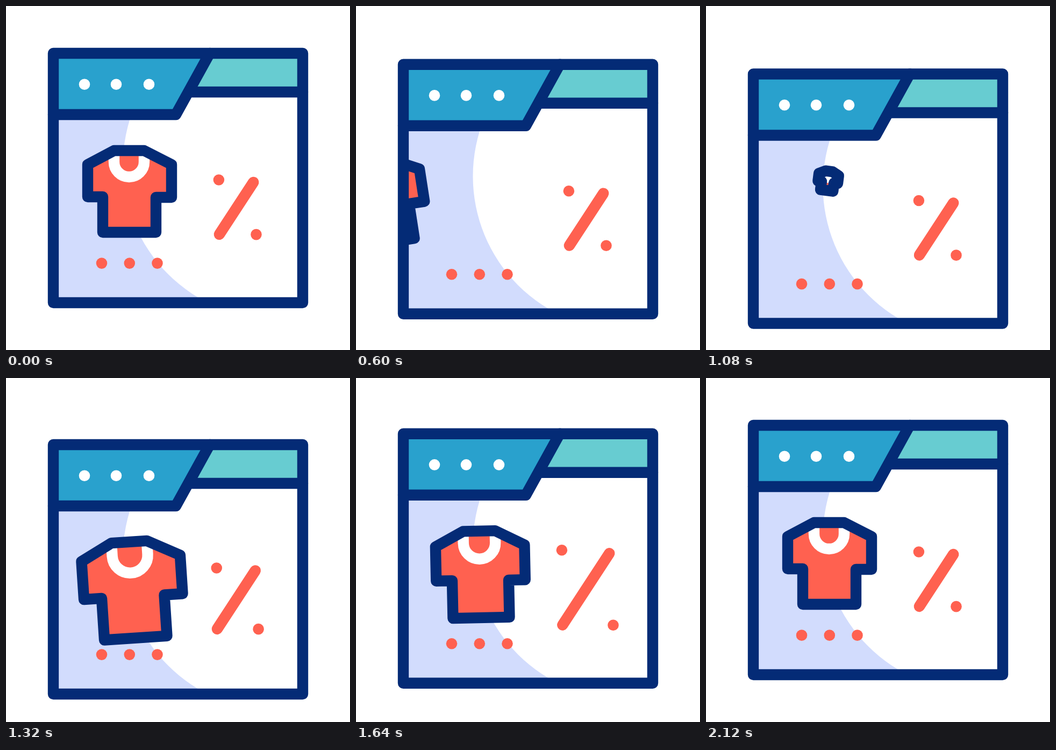
Write an HTML page with a canvas that moves like this. It is 640 px wide and 640 px high and loops after 2.28 s.

```html
<!DOCTYPE html>
<html lang="en">
<head>
<meta charset="utf-8">
<title>Shop window</title>
<style>
  html, body { margin: 0; width: 100%; height: 100%; overflow: hidden; background: #fff; }
  canvas { display: block; width: 100vmin; height: 100vmin; }
</style>
</head>
<body>
<canvas id="stage" width="640" height="640"></canvas>
<script>
const ctx = document.getElementById('stage').getContext('2d');
const LOOP = 2280, STEP = 40;
const NAVY = '#042b76', BLUE = '#29a1cd', TEAL = '#67ccd1',
      RED = '#ff6150', LILAC = '#d2dcfd', WHITE = '#fff';
const LINE = 20.4;
const NECK = { x: 229, y: 269 };
// Shirt outline relative to the middle of the neckline
const SHIRT = [[-28, 0], [28, 0], [79, 26], [79, 87], [50, 87],
               [50, 152], [-49, 152], [-49, 86], [-77, 86], [-77, 26]];

// Cubic bezier easing with control points (a, 0) and (b, 1)
function ease(x, a = 0.6, b = 0.4) {
  if (x <= 0) return 0;
  if (x >= 1) return 1;
  let lo = 0, hi = 1, s = 0.5;
  for (let i = 0; i < 24; i++) {
    s = (lo + hi) / 2;
    const r = 1 - s;
    if (3 * a * r * r * s + 3 * b * r * s * s + s * s * s < x) lo = s;
    else hi = s;
  }
  return s * s * (3 - 2 * s);
}

function tween(t, t0, t1, from, to, a, b) {
  return from + (to - from) * ease((t - t0) / (t1 - t0), a, b);
}

function poly(points, close = true) {
  ctx.beginPath();
  points.forEach(([x, y]) => ctx.lineTo(x, y));
  if (close) ctx.closePath();
}

function fill(points, color) {
  poly(points);
  ctx.fillStyle = color;
  ctx.fill();
}

function stroke(points, color, close = false) {
  poly(points, close);
  ctx.strokeStyle = color;
  ctx.stroke();
}

function dot(x, y, color, r = 10.3) {
  ctx.beginPath();
  ctx.arc(x, y, r, 0, Math.PI * 2);
  ctx.fillStyle = color;
  ctx.fill();
}

// Scales the path but keeps the line weight
function shirt(dx, angle, k) {
  ctx.save();
  ctx.translate(NECK.x + dx, NECK.y);
  ctx.rotate(angle * Math.PI / 180);
  const body = SHIRT.map(([x, y]) => [x * k, y * k]);
  fill(body, RED);
  ctx.lineCap = 'butt';
  ctx.beginPath();
  ctx.moveTo(-28 * k, 0);
  ctx.lineTo(-28 * k, 21 * k);
  ctx.arc(0, 21 * k, 28 * k, Math.PI, 0, true);
  ctx.lineTo(28 * k, 0);
  ctx.strokeStyle = WHITE;
  ctx.stroke();
  stroke(body, NAVY, true);
  ctx.restore();
}

function drawShirt(t) {
  if (t < 920) {
    const dx = tween(t, 0, 1120, 0, -360, 0.612, 0.443);
    shirt(dx, tween(t, 0, 500, 0, -8.8), 1);
  } else if (t < 1380) {
    const k = tween(t, 915, 1380, 0, 1.2);
    if (k > 0.001) shirt(0, tween(t, 915, 1380, 10, -4), k);
  } else {
    shirt(0, tween(t, 1380, 1826, -4, 0), tween(t, 1380, 1826, 1.2, 1));
  }
}

function drawPercent(t) {
  const k = t < 1570 ? tween(t, 1140, 1570, 1, 1.383)
                     : tween(t, 1570, 2040, 1.383, 1);
  const cx = 430.7, cy = 374.3;
  const at = (x, y) => [cx + x * k, cy + y * k];
  dot(...at(-34.8, -50.8), RED);
  dot(...at(34.8, 50.8), RED);
  stroke([at(29.6, -46.4), at(-33.8, 50.6)], RED);
}

function draw(t) {
  const lift = t < 1120 ? tween(t, 0, 1120, 0, 38.6, 0.612, 0.443)
                        : tween(t, 1120, 2160, 38.6, 0, 0.486, 0.398);
  ctx.fillStyle = WHITE;
  ctx.fillRect(0, 0, 640, 640);
  ctx.save();
  ctx.translate(0, lift);
  ctx.lineWidth = LINE;
  ctx.lineJoin = ctx.lineCap = 'round';

  ctx.save();
  ctx.beginPath();
  ctx.rect(88, 88, 464, 464);
  ctx.clip();
  ctx.fillStyle = LILAC;
  ctx.fillRect(88, 88, 464, 464);
  dot(504.2, 296, WHITE, 286.7);
  fill([[339, 88], [552, 88], [552, 160], [339, 160]], TEAL);
  fill([[88, 88], [379, 88], [316, 202], [88, 202]], BLUE);
  [178, 229.8, 281.5].forEach(x => dot(x, 478.6, RED));
  drawShirt(t);
  drawPercent(t);
  ctx.restore();

  [146, 205, 266].forEach(x => dot(x, 145.7, WHITE));
  stroke([[88, 202], [316, 202], [379, 88]], NAVY);
  stroke([[341, 160], [552, 160]], NAVY);
  stroke([[88, 88], [552, 88], [552, 552], [88, 552]], NAVY, true);
  ctx.restore();
}

const start = performance.now();
function tick() {
  const t = Math.max(0, performance.now() - start) % LOOP;
  draw(Math.floor(t / STEP) * STEP);
  requestAnimationFrame(tick);
}
tick();
</script>
</body>
</html>
```
